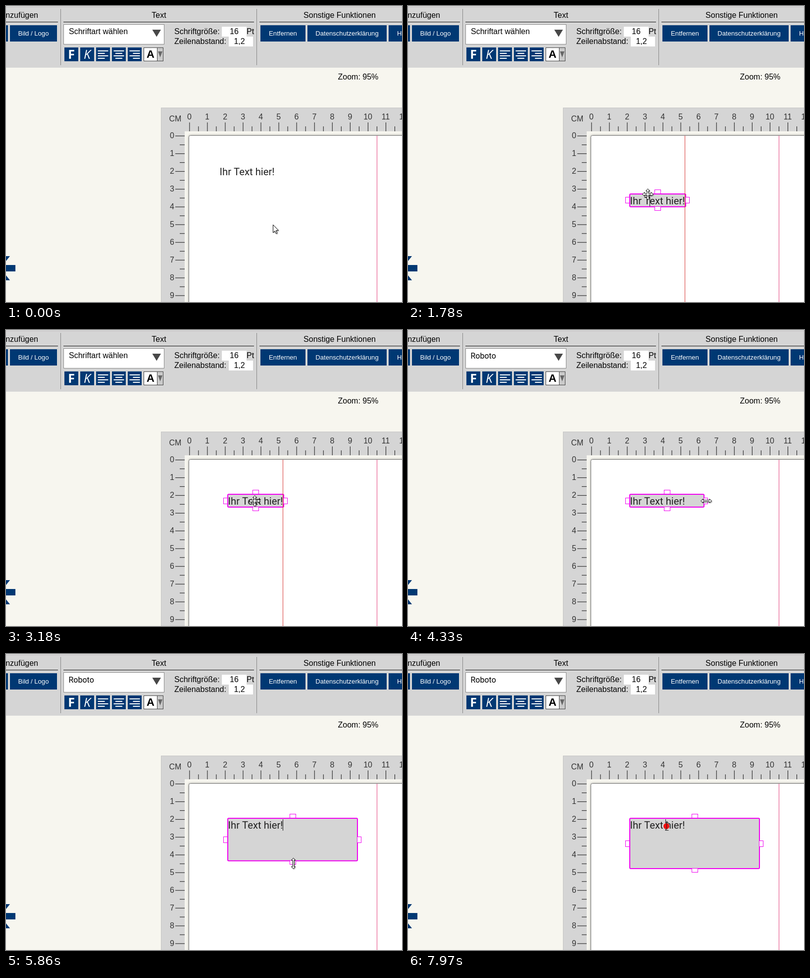
Animation of 800 by 600 pixels, one loop 8000 ms. Source, as an HTML page with a canvas:

```html
<!DOCTYPE html>
<html lang="de">
<head>
<meta charset="utf-8">
<title>Texteditor</title>
<style>
html, body { margin: 0; width: 100%; height: 100%; overflow: hidden; background: #f7f6ef; }
canvas { display: block; width: 800px; height: 600px; }
</style>
</head>
<body>
<canvas id="stage" width="800" height="600"></canvas>
<script>
const ctx = document.getElementById('stage').getContext('2d');
const LOOP = 8000;
const BLUE = '#003873', GREY = '#d5d5d5', CREAM = '#f7f6ef', PINK = '#f000f0';
const UI = '"Liberation Sans", Arial, sans-serif';
const ROBOTO = 'Roboto, sans-serif';
const HALF_CM = 18.03, GUIDE = 559.5;
const GRAB_X = 44, GRAB_Y = 13, LAG = 90;

// Key moments of the story
const PRESS = 940, SNAP = 1060, RELEASE = 2560, REGRAB = 2680, DROP = 3400;
const FOCUS = 3700, WIDEN = 4180, HEIGHTEN = 5330, SELECT = 6610, DESELECT = 7140;
const CLICKS = [PRESS - 20, FOCUS, SELECT - 100, DESELECT - 10, 7880];

// Pointer moves: start, end, destination; it rests in between
const START = { x: 539, y: 443 };
const MOVES = [
  [130, 910, 474, 335],
  [PRESS, 1300, 548, 380],
  [1320, 1690, 486, 394],
  [1690, 1800, 484, 380],
  [1800, 2380, 603, 346],
  [REGRAB, 3180, 502, 346],
  [3370, 3660, 556, 348],
  [3750, 4050, 566, 346],
  [WIDEN, 4650, 714, 346],
  [4720, 5200, 581, 364],
  [HEIGHTEN, 6080, 580, 440],
  [6160, 6500, 515, 350],
  [7420, 7860, 522, 349]
];

const within = (t, a, b) => t >= a && t < b;
const clamp = (v, a, b) => Math.min(b, Math.max(a, v));
const ease = k => k * k * (3 - 2 * k);

function pointer(t) {
  let { x, y } = START;
  for (const [from, to, tx, ty] of MOVES) {
    const k = ease(clamp((t - from) / (to - from), 0, 1));
    x += (tx - x) * k;
    y += (ty - y) * k;
  }
  return { x, y };
}

function rect(x, y, w, h, fill) {
  ctx.fillStyle = fill;
  ctx.fillRect(x, y, w, h);
}

function frame(x, y, w, h, color) {
  ctx.strokeStyle = color;
  ctx.lineWidth = 1;
  ctx.strokeRect(x, y, w, h);
}

function line(x0, y0, x1, y1, color) {
  ctx.strokeStyle = color;
  ctx.lineWidth = 1;
  ctx.beginPath();
  ctx.moveTo(x0, y0);
  ctx.lineTo(x1, y1);
  ctx.stroke();
}

function label(s, x, y, { font = '16px ' + UI, color = '#000', align = 'left' } = {}) {
  ctx.font = font;
  ctx.fillStyle = color;
  ctx.textAlign = align;
  ctx.fillText(s, x, y);
}

function shape(points, fill, stroke) {
  ctx.beginPath();
  points.forEach(([x, y]) => ctx.lineTo(x, y));
  ctx.closePath();
  if (fill) { ctx.fillStyle = fill; ctx.fill(); }
  if (stroke) { ctx.strokeStyle = stroke; ctx.lineWidth = 1; ctx.stroke(); }
}

function triangle(x, y, w, h, fill) {
  shape([[x, y], [x + w, y], [x + w / 2, y + h]], fill);
}

function button(x, w, s) {
  rect(x, 39, w, 33, BLUE);
  label(s, x + w / 2, 60, { font: '13.1px ' + UI, color: '#fff', align: 'center' });
}

function group(title, x, from, to, align = 'center') {
  label(title, x, 24, { align });
  line(from, 32.5, to, 32.5, '#111');
}

function iconRow() {
  const letter = { color: '#fff', align: 'center' };
  for (let i = 0; i < 5; i++) {
    const x = 118 + 32 * i;
    rect(x, 84, 28, 28, BLUE);
    if (i < 2) {
      const style = i ? 'italic' : 'bold';
      label('FK'[i], x + 14, 107, { ...letter, font: style + ' 25px "Open Sans", sans-serif' });
      continue;
    }
    for (let row = 0; row < 4; row++) {
      const w = row % 2 ? 14 : 21;
      rect(x + 3.5 + (21 - w) * (i - 2) / 2, 90 + 5 * row, w, 2, '#fff');
    }
  }
  rect(278, 84, 28, 28, '#fff');
  rect(306, 84, 12, 28, '#cacaca');
  frame(278.5, 84.5, 39, 27, '#444');
  line(305.5, 84, 305.5, 112, '#444');
  label('A', 292, 105, { font: 'bold 22px ' + UI, align: 'center' });
  triangle(307, 92, 9, 12, '#666');
}

function toolbar(t) {
  rect(0, 0, 800, 125, GREY);
  line(0, 2.5, 800, 2.5, '#c9c5c7');
  group('Hinzufügen', 65, 0, 105, 'right');
  group('Text', 309, 116, 501);
  group('Sonstige Funktionen', 674, 512, 800);
  for (const x of [110.5, 506.5]) line(x, 6, x, 120, '#858585');
  rect(0, 39, 4, 33, BLUE);
  button(8, 95, 'Bild / Logo');
  button(514, 91, 'Entfernen');
  button(609, 160, 'Datenschutzerklärung');
  button(773, 60, 'Hilfe');

  rect(116, 37, 204, 41, '#fff');
  frame(116.5, 37.5, 203, 40, '#8a8a8a');
  triangle(295.5, 48, 17.5, 14.5, '#484848');
  if (t < FOCUS) label('Schriftart wählen', 127, 57);
  else label('Roboto', 126.5, 58, { font: '16px ' + ROBOTO });

  rect(436, 42, 50, 20, '#fff');
  rect(450, 62, 49, 20, '#fff');
  label('Schriftgröße:', 340, 57);
  label('16', 461, 57, { align: 'center' });
  label('Pt', 486, 57);
  label('Zeilenabstand:', 340, 77);
  label('1,2', 471.5, 77, { align: 'center' });
  iconRow();
}

function rulers() {
  const ink = { color: '#333', align: 'center' };
  rect(313, 206, 487, 394, GREY);
  line(313.5, 206, 313.5, 600, '#c4c4c4');
  line(313, 206.5, 800, 206.5, '#c4c4c4');
  rect(361, 254, 439, 346, CREAM);
  label('CM', 342, 234, ink);
  for (let i = 0; i < 25; i++) {
    const major = i % 2 === 0;
    const x = 370.8 + i * HALF_CM, y = 263.4 + i * 17.98;
    line(x, major ? 236 : 244, x, 254, '#111');
    if (y < 600) line(major ? 342 : 351, y, 361, y, '#111');
    if (!major) continue;
    label(i / 2, x - .3, 230, ink);
    label(i / 2, 335.5, y + 5, ink);
  }
}

function page() {
  ctx.save();
  ctx.shadowColor = 'rgba(0,0,0,.45)';
  ctx.shadowBlur = 4;
  ctx.fillStyle = '#fff';
  ctx.beginPath();
  ctx.roundRect(369.5, 262.5, 600, 500, 3);
  ctx.fill();
  ctx.restore();
  ctx.strokeStyle = '#777';
  ctx.lineWidth = 1;
  ctx.stroke();
  line(749.5, 263, 749.5, 600, '#e6457f');
}

function workspace() {
  label('Zoom: 95%', 670.5, 149);
  rect(0, 525, 19, 13, BLUE);
  shape([[0, 507], [8, 507], [0, 517]], BLUE);
  shape([[0, 546], [8, 556], [0, 556]], BLUE);
  rulers();
  page();
}

// The box trails the pointer, snaps to the guide, then is resized
function boxAt(t) {
  const held = pointer(clamp(t - LAG, PRESS, DROP - 100));
  const box = { x: 431, y: held.y - GRAB_Y, w: 113, h: 26 };
  if (t >= SNAP) {
    const step = box.w / 2 - 1;
    box.x = 448 + step * clamp(Math.round((held.x - GRAB_X - 448) / step), 0, 2);
  }
  if (t >= WIDEN) box.w = pointer(Math.min(t, 4700)).x - 4 - box.x;
  if (t >= HEIGHTEN) box.h = pointer(Math.min(t, 6120)).y - 5 - box.y;
  return box;
}

function handle(x, y, w, h) {
  const left = Math.floor(x) + .5, top = Math.floor(y) + .5;
  rect(left, top, w, h, '#fff');
  frame(left, top, w, h, PINK);
}

function selection({ x, y, w, h }) {
  line(x + 3.5, y + 2, x + 3.5, y + h - 2, '#d4d4d0');
  line(x + 2, y + h - 1.5, x + w, y + h - 1.5, '#d4d4d0');
  line(x + 1, y + 25.5, x + 115, y + 25.5, '#c8c8c8');
  line(x + 114.5, y + 1, x + 114.5, y + 26, '#c8c8c8');
  rect(x + 1, y + 1, 112, 24, '#2a84f0');
}

function caret(t, { x, y }) {
  const blink = t < RELEASE || (t >= FOCUS && (t - FOCUS) % 1060 < 530);
  if (!blink) return;
  const offset = t < FOCUS ? 40.5 : t < DESELECT ? 111.5 : 72.5;
  line(x + offset, y + 2, x + offset, y + 25, '#111');
}

function textBox(t, box) {
  const { x, y, w, h } = box;
  const active = t >= PRESS, selecting = within(t, SELECT, DESELECT);
  if (active) {
    rect(x, y, w, h, t < SNAP + 30 || selecting ? CREAM : GREY);
    if (selecting) selection(box);
    ctx.strokeStyle = PINK;
    ctx.lineWidth = 2;
    ctx.beginPath();
    ctx.roundRect(x, y, w, h, 2);
    ctx.stroke();
    for (const hx of [x - 9, x + w - .5]) handle(hx, y + h / 2 - 6, 8, 12);
    for (const hy of [y - 8.5, y + h - .5]) handle(x + w / 2 - 6, hy, 12, 8);
  }
  label('Ihr Text hier!', x + .5, y + 21, { font: '20.27px ' + ROBOTO, color: selecting ? '#fff' : '#222' });
  if (active && !selecting) caret(t, box);
}

function clicks(t) {
  for (const start of CLICKS) {
    const age = t - start;
    if (!within(age, 0, 220)) continue;
    const { x, y } = pointer(start);
    const fade = clamp((220 - age) / 100, 0, 1);
    ctx.globalAlpha = .4 + .6 * fade;
    ctx.fillStyle = `hsl(${30 * (1 - fade)} 90% 50%)`;
    ctx.beginPath();
    ctx.arc(x, y, 6 * fade, 0, Math.PI * 2);
    ctx.fill();
    ctx.globalAlpha = 1;
  }
}

const turn = ([x, y]) => [-y, x];
const ARM = [[-1.5, -1.5], [-1.5, -6.5], [-4, -6.5], [0, -11], [4, -6.5], [1.5, -6.5]];
const ARMS = [ARM];
for (let i = 0; i < 3; i++) ARMS.push(ARMS[i].map(turn));
const OUTLINES = {
  arrow: [[0, 0], [0, 16], [3.6, 12.6], [6, 18], [8.4, 17], [6, 11.6], [11, 11.4]],
  move: ARMS.flat(),
  ns: [...ARMS[0], ...ARMS[2]],
  ew: [...ARMS[1], ...ARMS[3]]
};

function cursorKind(t, p, box) {
  if (within(t, SELECT, DESELECT - 190)) return 'none';
  if (within(t, PRESS, DROP)) return 'move';
  const dx = p.x - box.x, dy = p.y - box.y;
  if (t > DROP) {
    if (Math.abs(dx - box.w - 4) < 6 && Math.abs(dy - box.h / 2) < 8) return 'ew';
    if (Math.abs(dx - box.w / 2) < 8 && Math.abs(dy - box.h - 4) < 6) return 'ns';
  }
  const inside = within(dx, 0, box.w) && within(dy, 0, box.h);
  return !inside ? 'arrow' : t < PRESS ? 'move' : 'beam';
}

function cursor(t, box) {
  const p = pointer(t), kind = cursorKind(t, p, box);
  if (kind === 'none') return;
  ctx.save();
  ctx.translate(Math.round(p.x) + .5, Math.round(p.y) + .5);
  if (kind === 'beam') {
    line(0, -7, 0, 7, '#222');
    for (const end of [-8, 8]) line(-3, end, 4, end, '#222');
  } else {
    ctx.shadowColor = 'rgba(0,0,0,.4)';
    ctx.shadowBlur = 2;
    ctx.shadowOffsetX = ctx.shadowOffsetY = 1.5;
    shape(OUTLINES[kind], '#fff');
    ctx.shadowColor = 'transparent';
    shape(OUTLINES[kind], null, '#000');
  }
  ctx.restore();
}

function draw(t) {
  const box = boxAt(t);
  rect(0, 0, 800, 600, CREAM);
  toolbar(t);
  workspace();
  textBox(t, box);
  if (within(t, SNAP, RELEASE) || within(t, REGRAB, DROP)) line(GUIDE, 263, GUIDE, 600, '#d83a36');
  clicks(t);
  cursor(t, box);
}

const begin = performance.now();
function tick() {
  draw((performance.now() - begin) % LOOP);
  requestAnimationFrame(tick);
}
tick();
</script>
</body>
</html>
```
